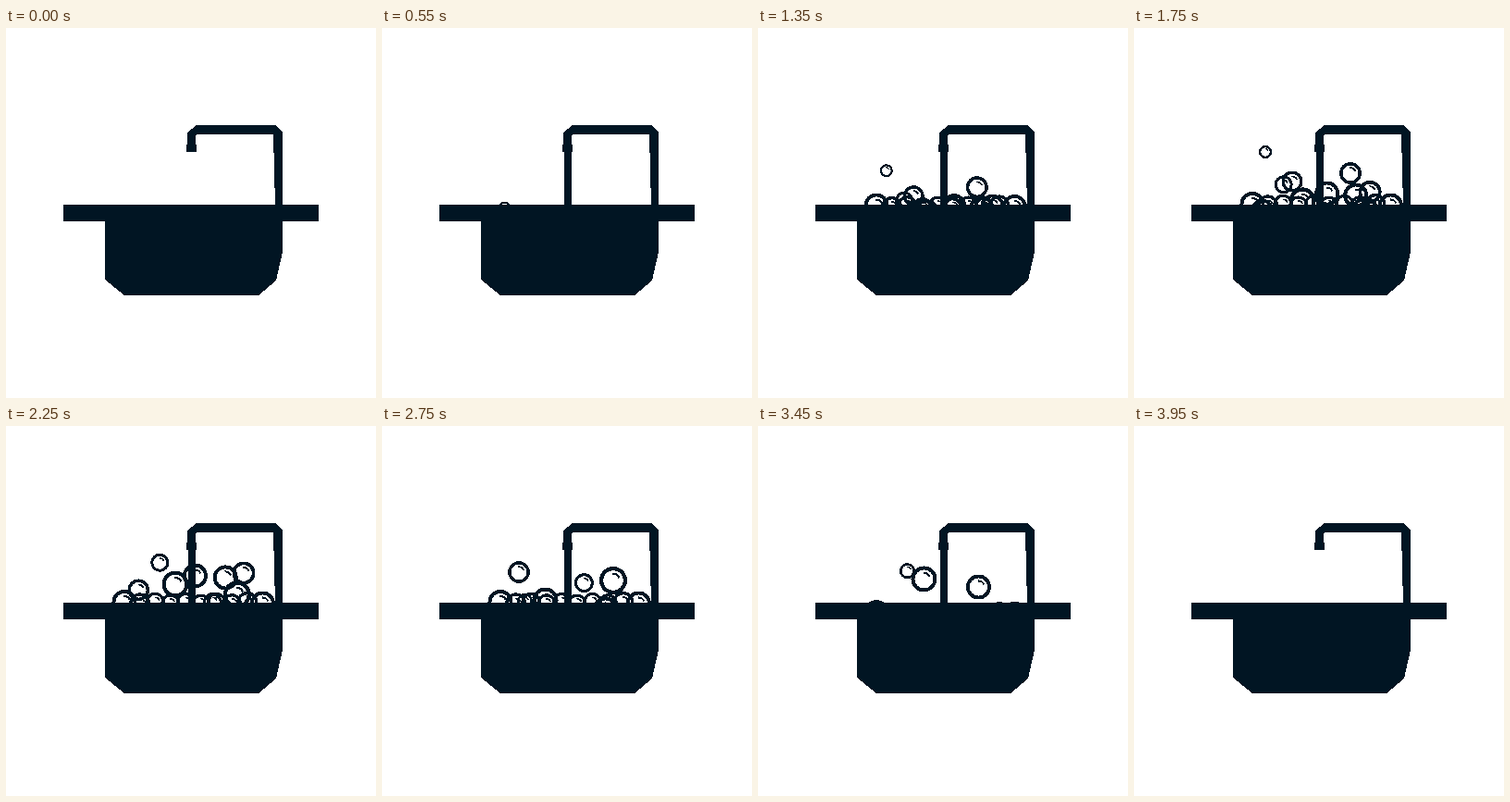
Recreate the animation shown at these times as an HTML page. Size 400 px wide and 400 px high, loop 4050 ms.

```html
<!DOCTYPE html>
<html lang="en">
<head>
<meta charset="utf-8">
<title>Sink</title>
<style>
  html, body { margin: 0; width: 100%; height: 100%; overflow: hidden; background: #fff; }
  svg { display: block; width: 100vw; height: 100vh; shape-rendering: crispEdges; }
</style>
</head>
<body>
<svg viewBox="0 0 400 400">
  <g id="foam" fill="none" stroke="#011523"></g>
  <g fill="#011523">
    <rect id="water" x="197" width="8"/>
    <path d="M195 134V126H196V113L206 105H291L299 113V192H291L289 115H206L205 117V126H206V134Z"/>
    <path d="M62 191H338V209H299V242L292 273L273 289H128L107 272V209H62Z"/>
  </g>
</svg>
<script>
const LOOP = 4050, STEP = 50, RIM = 191, SPOUT = 134;
const OPEN = 400, CLOSE = 3700;
const foam = document.getElementById('foam');
const water = document.getElementById('water');
const clamp = v => Math.max(0, Math.min(1, v));

function addBubble(r) {
  const node = document.createElementNS('http://www.w3.org/2000/svg', 'g');
  const w = 0.5 + r * 0.25, s = r * 0.48;
  node.innerHTML =
    `<circle r="${r - w / 2}" stroke-width="${w}"/>` +
    `<path d="M${-s * 0.1} ${-s}A${s} ${s} 0 0 1 ${s * 0.9} ${-s * 0.4}" stroke-width="${r * 0.15}"/>`;
  foam.append(node);
  return node;
}

function place(node, x, y, shown) {
  node.setAttribute('transform', `translate(${x} ${y})`);
  node.setAttribute('visibility', shown ? 'visible' : 'hidden');
}

// Foam along the rim: evenly spaced, larger at both ends
const pile = Array.from({ length: 10 }, (_, i) => {
  const r = 10.5 + 3 * Math.abs((i - 4.5) / 4.5) ** 4;
  return { x: 128 + i * 16.6, y: RIM - 0.5 + (i % 2) * 1.5, node: addBubble(r) };
});

// Free bubbles: radius and one point of the path (x, y, time).
// Small ones rise faster and live longer; a draught carries them sideways.
const risers = [
  [7, 142, 134, 1750],
  [10, 164, 158.5, 2000],
  [11.5, 171, 166, 1750],
  [12, 234, 157, 1750],
  [13.5, 206.5, 170.5, 2000],
  [13.5, 238.5, 172.5, 2000],
  [12.5, 257, 159, 2250],
  [14.5, 183, 171, 2250],
  [11.8, 148, 158, 2750],
  [15, 250, 167, 2750],
  [10.5, 215, 155, 3100],
  [14, 178, 177, 3100],
  [8.5, 158, 173, 3100],
  [13.5, 240, 186, 3100]
].map(([r, x, y, at]) => {
  const speed = 0.068 - 0.0025 * r;
  const pop = at - (RIM - y) / speed + 1600 - 50 * r;
  const drift = 0.01 * Math.cos((x - 155) / 20);
  return { r, x, y, at, speed, drift, pop: Math.min(pop, CLOSE), node: addBubble(r) };
});

// Top and bottom of the falling water
function waterSpan(t) {
  for (const drip of [100, 3850]) {
    if (t >= drip && t < drip + 100) return t < drip + 50 ? [SPOUT, 152] : [160, RIM];
  }
  const fall = u => SPOUT + (RIM - SPOUT) * clamp(u / 150);
  return [fall(t - CLOSE + STEP), fall(t - OPEN + STEP)];
}

function draw(ms) {
  const t = Math.floor((ms % LOOP) / STEP) * STEP;
  const [top, bottom] = waterSpan(t);
  water.setAttribute('y', top);
  water.setAttribute('height', bottom - top);

  const sunk = 16 * (clamp((1450 - t) / 1050) + clamp((t - 3100) / 500));
  for (const b of pile) place(b.node, b.x, b.y + sunk, sunk < 16);

  for (const b of risers) {
    const age = t - b.at;
    const y = b.y - b.speed * age;
    place(b.node, b.x + b.drift * age, y, t >= OPEN && t < b.pop && y - b.r < RIM);
  }
}

const begin = performance.now();
function tick() {
  draw(performance.now() - begin);
  requestAnimationFrame(tick);
}
draw(0);
requestAnimationFrame(tick);
</script>
</body>
</html>
```
